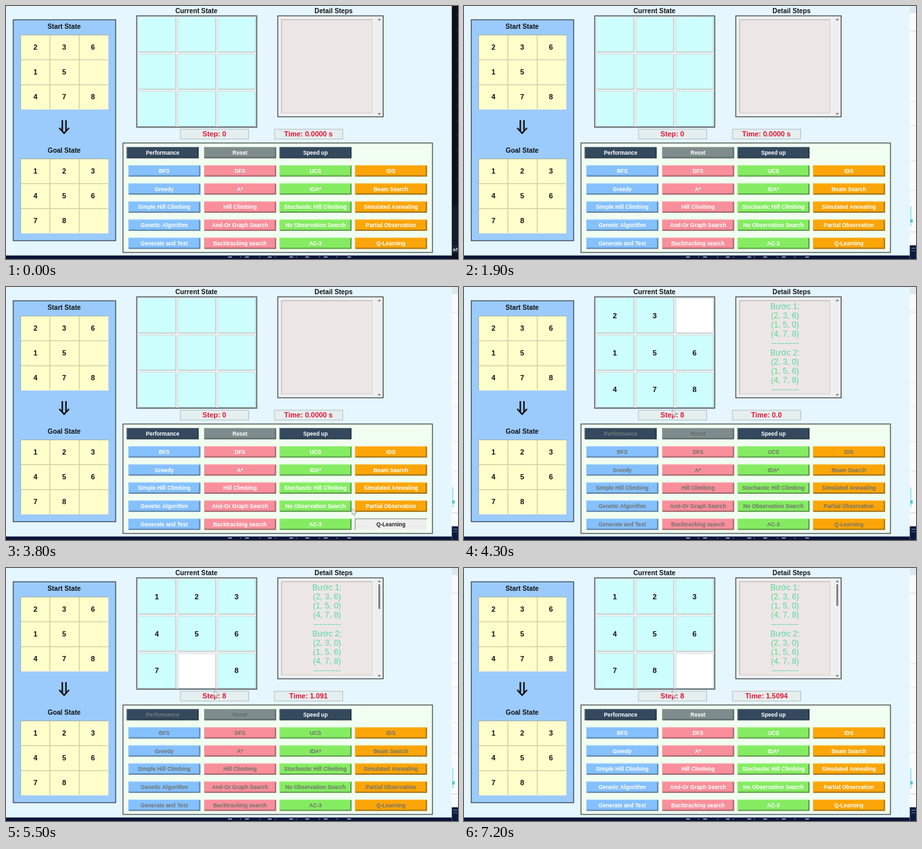
These frames come from a looping animation (692x388 px, 7600 ms). An HTML page with a canvas:

```html
<!DOCTYPE html>
<html lang="en">
<head>
<meta charset="utf-8">
<title>8-puzzle solver</title>
<style>
html, body { margin: 0; width: 100%; height: 100%; overflow: hidden; background: #e6f6ff; }
canvas { display: block; }
</style>
</head>
<body>
<canvas id="stage" width="692" height="388"></canvas>
<script>
const ctx = document.getElementById('stage').getContext('2d');
const LOOP = 7600;
const WINDOW_SWAP = 700, PRESS = 3200, DONE = 5900;
const STEP_TIMES = [4100, 4300, 4500, 4700, 4900, 5100, 5300, 5600];
const CLOCK = ['0.0000 s', '0.0', '0.2172', '0.4339', '0.6527', '0.8716', '1.091', '1.3049'];
const FINAL_CLOCK = '1.5094';
const FONT = '"Liberation Sans", Arial, sans-serif';
const SHADE = 'rgba(30, 35, 35, 0.5)', GLOW = 'rgba(255, 255, 255, 0.3)';

const START = [2, 3, 6, 1, 5, 0, 4, 7, 8];
const GOAL = [1, 2, 3, 4, 5, 6, 7, 8, 0];
const BLANK_PATH = [5, 2, 1, 0, 3, 6, 7, 8];
const boards = [START];
for (let i = 1; i < BLANK_PATH.length; i++) {
  const next = boards[i - 1].slice();
  next[BLANK_PATH[i - 1]] = next[BLANK_PATH[i]];
  next[BLANK_PATH[i]] = 0;
  boards.push(next);
}

const COLUMNS = [
  { x: 187, color: '#85c0ff', names: ['BFS', 'Greedy', 'Simple Hill Climbing', 'Genetic Algorithm', 'Generate and Test'] },
  { x: 303, color: '#f88f9b', names: ['DFS', 'A*', 'Hill Climbing', 'And-Or Graph Search', 'Backtracking search'] },
  { x: 418.5, color: '#85ec62', names: ['UCS', 'IDA*', 'Stochastic Hill Climbing', 'No Observation Search', 'AC-3'] },
  { x: 534, color: '#fba508', names: ['IDS', 'Beam Search', 'Simulated Annealing', 'Partial Observation', 'Q-Learning'] }
];

// Time, x and y of the pointer tip
const POINTER = [[2000, 604, 389], [2700, 592, 371], [3500, 592, 371], [3800, 530, 340], [4300, 319, 188]];

function rect(x, y, w, h, color) {
  ctx.fillStyle = color;
  ctx.fillRect(x, y, w, h);
}

function box(x, y, w, h, fill, border, line = 1) {
  rect(x, y, w, h, border);
  rect(x + line, y + line, w - 2 * line, h - 2 * line, fill);
}

function bevel(x, y, w, h, fill, topLeft, bottomRight) {
  rect(x, y, w, h, fill);
  rect(x, y, w, 1, topLeft);
  rect(x, y + 1, 1, h - 1, topLeft);
  rect(x + 1, y + h - 1, w - 1, 1, bottomRight);
  rect(x + w - 1, y + 1, 1, h - 2, bottomRight);
}

function text(str, x, y, size, color = '#111', weight = 'bold') {
  ctx.font = `${weight} ${size}px ${FONT}`;
  ctx.textAlign = 'center';
  ctx.textBaseline = 'alphabetic';
  ctx.fillStyle = color;
  ctx.fillText(str, x, y + size * 0.36);
}

function polygon(points, fill, stroke) {
  ctx.beginPath();
  points.forEach(([x, y]) => ctx.lineTo(x, y));
  ctx.closePath();
  ctx.fillStyle = fill;
  ctx.fill();
  if (stroke) {
    ctx.strokeStyle = stroke;
    ctx.lineWidth = 0.8;
    ctx.stroke();
  }
}

function button(label, x, y, color, ink, sunken = false) {
  const w = 110.5, h = 17.5;
  bevel(x, y, w, h, color, sunken ? SHADE : GLOW, sunken ? GLOW : SHADE);
  if (!sunken) {
    rect(x + 1, y + h - 2, w - 2, 1, 'rgba(30, 35, 35, 0.3)');
    rect(x + w - 2, y + 1, 1, h - 3, 'rgba(30, 35, 35, 0.3)');
  }
  text(label, x + w / 2, y + h / 2, 8.4, ink);
}

function drawDesktop(t) {
  rect(0, 382.6, 692, 6, '#0b1436');
  for (let i = 0; i < 13; i++) {
    rect(340 + 15 * i + 4 * Math.sin(i * 2.3), 384, 4 + 2 * Math.cos(i * 3.1), 2, i % 2 ? '#3f5f8d' : '#7d93b4');
  }
  if (t < WINDOW_SWAP) {
    rect(682.5, 0, 10, 388, '#0b101a');
    for (let y = 14; y < 290; y += 23) rect(689, y, 3, 1, '#273140');
    rect(684, 306, 8, 59, '#111b2d');
    rect(683, 366, 9, 13, '#15233c');
    text('aff', 689, 373, 8, '#d1d7df');
  } else {
    rect(682.5, 0, 10, 388, '#fafbfc');
    rect(682.5, 0, 10, 11, '#dfe8ee');
    rect(683, 38, 9, 1, '#d8dce1');
    for (const y of [146, 183, 237, 282]) rect(684, y, 8, 1, '#e1e4e8');
    rect(683, 307, 2, 31, '#a5e6ec');
    rect(683, 327, 4, 5, '#5cc9d3');
    rect(683, 346, 9, 1, '#cfd4da');
    rect(682.5, 367, 10, 21, '#0b1b40');
    rect(685, 371, 6, 1, '#7f92b5');
    rect(685, 375, 6, 1, '#566d97');
  }
}

function smallBoard(title, titleY, y, board) {
  text(title, 89, titleY, 10.2);
  bevel(22, y, 135, 115, '#ffffcc', '#a9b1a8', '#e9ecdf');
  for (let i = 1; i < 3; i++) {
    rect(22 + 45 * i - 0.5, y + 1, 1.3, 113, '#cfcda4');
    rect(23, y + 38.3 * i - 0.5, 133, 1.3, '#cfcda4');
  }
  board.forEach((n, i) => {
    if (n) text(n, 45 + 44 * (i % 3), y + 19.5 + 37.7 * Math.floor(i / 3), 11);
  });
}

function drawLeftPanel() {
  box(10.5, 20.5, 158, 340, '#9bcbfd', '#2b3947', 1.2);
  smallBoard('Start State', 31.5, 44, START);
  smallBoard('Goal State', 221, 234, GOAL);
  ctx.strokeStyle = '#111';
  ctx.lineWidth = 2.3;
  ctx.beginPath();
  for (const x of [86.2, 91.8]) {
    ctx.moveTo(x, 175);
    ctx.lineTo(x, 192);
  }
  ctx.moveTo(81.5, 187);
  ctx.lineTo(89, 195);
  ctx.lineTo(96.5, 187);
  ctx.stroke();
}

function drawCurrentState(board) {
  text('Current State', 291.5, 7.5, 10.2);
  box(199.5, 14.5, 185, 172, '#eeeeee', '#30373c', 1.2);
  for (let i = 0; i < 9; i++) {
    const col = i % 3, row = Math.floor(i / 3);
    const fill = board && !board[i] ? '#ffffff' : '#ceffff';
    bevel(202 + 61 * col, 16.5 + 57 * row, 58.5, 54.5, fill, '#d3dddd', '#b2bebe');
    if (board && board[i]) text(board[i], 231 + 61 * col, 44 + 56.6 * row, 11.3);
  }
}

function drawDetails(shown) {
  text('Detail Steps', 501.5, 7.5, 10.2);
  box(415.5, 14.5, 162.5, 156, '#f0f0f0', '#30373c', 1.2);
  bevel(421.5, 20.5, 139.5, 144, '#ede6e6', '#b3b0b0', '#d3d0d0');
  rect(566, 17, 10, 151, '#eeeeee');
  polygon([[569, 22], [574, 22], [571.5, 18.5]], '#888');
  polygon([[569, 164], [574, 164], [571.5, 167.5]], '#888');
  if (shown > 2) rect(570, 25, 3, 264 / shown, '#858585');
  boards.slice(0, Math.min(shown, 2)).forEach((b, i) => {
    const rows = [0, 3, 6].map(r => `(${b.slice(r, r + 3).join(', ')})`);
    [`Bước ${i + 1}:`, ...rows, '----------'].forEach((line, j) =>
      text(line, 491.5, 29 + 14.2 * (i * 5 + j), 12.5, '#55d99c', 'normal'));
  });
}

function counter(label, x) {
  box(x, 188.5, 105.5, 16, '#e5efef', '#b5bfc1');
  text(label, x + 52.5, 196.5, 10.9, '#df1535');
}

function drawButtons(t, shown) {
  const busy = shown > 0 && t < DONE;
  const waiting = t >= PRESS && !shown;
  box(178.5, 209.5, 475, 169, '#f0fff0', '#364039', 1.2);
  button('Performance', 184.5, 216, '#34495e', busy ? '#747b80' : '#fff');
  button('Reset', 303, 216, '#7f8c8d', busy ? '#666d6e' : '#fff');
  button('Speed up', 418.5, 216, '#34495e', '#fff');
  for (const { x, color, names } of COLUMNS) {
    names.forEach((name, row) => {
      const active = waiting && name === 'Q-Learning';
      const ink = active ? '#222' : busy ? '#70736c' : '#fff';
      button(name, x, 244 + 27.75 * row, active ? '#eeeeee' : color, ink, active);
    });
  }
}

function drawPointer(t) {
  if (t < POINTER[0][0]) return;
  let [, x, y] = POINTER[POINTER.length - 1];
  for (let i = 1; i < POINTER.length; i++) {
    const [t0, x0, y0] = POINTER[i - 1], [t1, x1, y1] = POINTER[i];
    if (t < t1) {
      const p = (t - t0) / (t1 - t0);
      x = x0 + (x1 - x0) * p;
      y = y0 + (y1 - y0) * p;
      break;
    }
  }
  const shape = [[0, 0], [0, 9], [2, 7.2], [3.5, 10.5], [5, 9.8], [3.6, 6.7], [6.5, 6.5]];
  polygon(shape.map(([dx, dy]) => [x + dx, y + dy]), '#fff', '#8b8b8b');
}

function draw(t) {
  const shown = STEP_TIMES.filter(s => t >= s).length;
  const clock = t >= DONE ? FINAL_CLOCK : CLOCK[Math.max(0, shown - 1)];
  rect(0, 0, 692, 388, '#e6f6ff');
  drawDesktop(t);
  drawLeftPanel();
  drawCurrentState(boards[shown - 1]);
  drawDetails(shown);
  counter(`Step: ${shown ? 8 : 0}`, 266.5);
  counter(`Time: ${clock}`, 410.5);
  drawButtons(t, shown);
  drawPointer(t);
}

const origin = performance.now();
function frame() {
  const t = (performance.now() - origin) % LOOP;
  draw(Math.floor(t / 100) * 100);
  requestAnimationFrame(frame);
}
frame();
</script>
</body>
</html>
```
